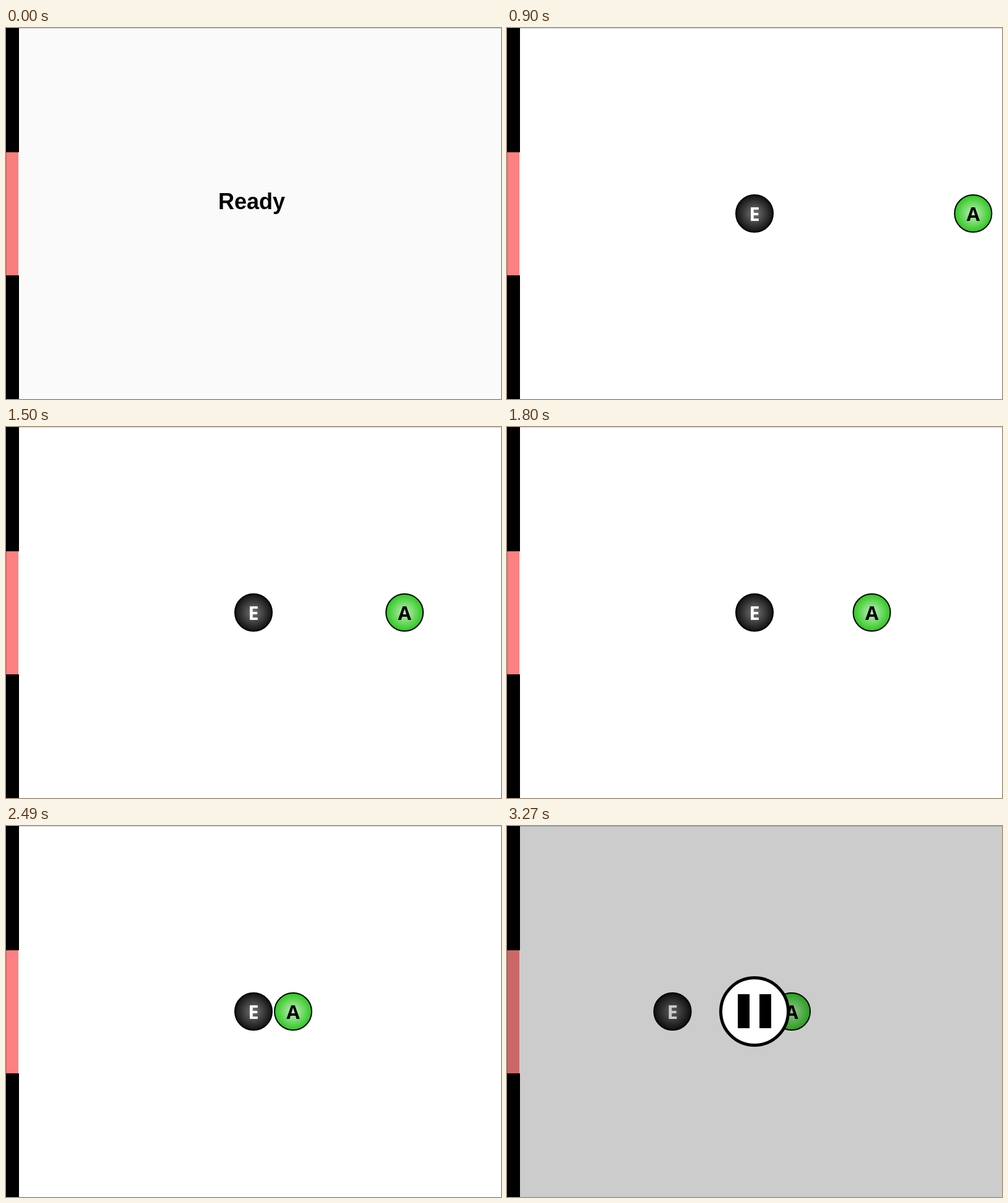
Write an HTML page with a canvas that moves like this. It is 800 px wide and 600 px high and loops after 3.3 s.

```html
<!DOCTYPE html>
<html>
<head>
<meta charset="utf-8">
<style>
  html, body { margin: 0; width: 800px; height: 600px; overflow: hidden; background: #fff; }
  canvas { display: block; }
</style>
</head>
<body>
<canvas id="stage" width="800" height="600"></canvas>
<script>
const ctx = document.getElementById('stage').getContext('2d');

const LOOP = 3300, TICK = 30;
const READY_END = 420, HIT = 2512, FREEZE = 3240, PAUSE = 3270;
const SPEED = 0.182; // px per ms
const REST_A = 460, REST_E = 400, MID_Y = 300;

function rect(color, x, y, w, h) {
  ctx.fillStyle = color;
  ctx.fillRect(x, y, w, h);
}

function disc(x, y, r, fill, line) {
  ctx.beginPath();
  ctx.arc(x, y, r, 0, Math.PI * 2);
  ctx.fillStyle = fill;
  ctx.fill();
  ctx.lineWidth = line;
  ctx.strokeStyle = '#000';
  ctx.stroke();
}

function label(text, x, y, font, color) {
  ctx.font = font;
  ctx.textAlign = 'center';
  ctx.fillStyle = color;
  ctx.fillText(text, x, y);
}

function ball(letter, x, inner, outer, ink) {
  const g = ctx.createRadialGradient(x, MID_Y, 0, x, MID_Y, 30);
  g.addColorStop(0, inner);
  g.addColorStop(1, outer);
  disc(x, MID_Y, 30, g, 2);
  label(letter, x, 312, 'bold 31px "Open Sans", "Noto Sans", sans-serif', ink);
}

function room() {
  rect('#fff', 0, 0, 800, 600);
  rect('#000', 0, 0, 21, 201);
  rect('#000', 0, 400, 21, 200);
  rect('#ff8080', 0, 201, 20, 199);
  rect('rgba(0,0,0,0.2)', 0, 201, 1, 199);
  rect('rgba(0,0,0,0.2)', 21, 0, 779, 1);
}

function shade(alpha) {
  rect(`rgba(0,0,0,${alpha})`, 0, 0, 800, 600);
}

function pauseSign() {
  shade(0.2);
  disc(400, MID_Y, 54.5, '#fff', 5);
  rect('#000', 373, 272, 19, 55);
  rect('#000', 408, 272, 19, 55);
}

function draw(t) {
  room();
  if (t < READY_END) {
    shade(0.02);
    label('Ready', 397, 293, 'bold 36px "Liberation Sans", Arial, sans-serif', '#000');
    return;
  }
  // The green ball stops on impact and hands its speed to the dark one.
  const run = SPEED * (Math.min(t, FREEZE) - HIT);
  ball('E', REST_E - Math.max(0, run), '#777', '#111', '#fff');
  ball('A', REST_A + Math.max(0, -run), '#c4efc0', '#2dc81e', '#000');
  if (t >= PAUSE) pauseSign();
}

const start = performance.now();
function frame() {
  const t = (performance.now() - start) % LOOP;
  draw(Math.floor(t / TICK) * TICK);
  requestAnimationFrame(frame);
}
frame();
</script>
</body>
</html>
```
